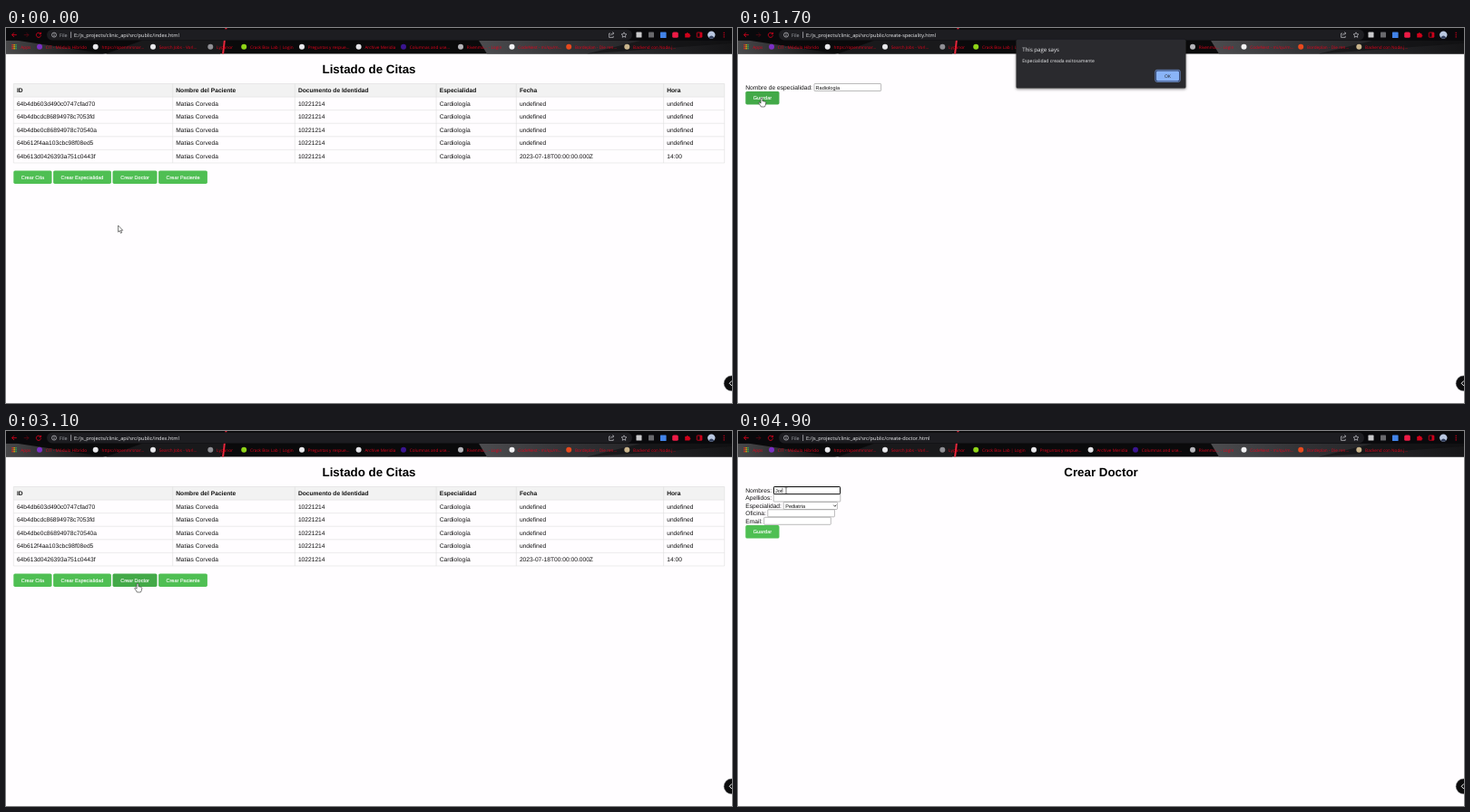
An HTML page that plays this animation: 800 by 414 pixels, repeating every 5 s.

```html
<!DOCTYPE html>
<html lang="es">
<head>
<meta charset="utf-8">
<title>Listado de Citas</title>
<style>
html, body { margin: 0; width: 100%; height: 100%; overflow: hidden; background: #fffdff; }
svg { display: block; width: 800px; height: 414px; text-rendering: geometricPrecision; }
text { font: 6.667px "Liberation Sans", Arial, sans-serif; fill: #111; white-space: pre; }
.h1 { font-size: 13.333px; font-weight: bold; text-anchor: middle; fill: #000; }
.th { font-weight: bold; }
.btn rect { fill: #4fbf53; }
.btn.hover rect { fill: #43a948; }
.btn text { font-size: 5.556px; fill: #fff; stroke: #fff; stroke-width: .12; text-anchor: middle; }
.field { font-size: 5.556px; }
.box { fill: #fff; stroke: #767676; stroke-width: .5; }
.box.focus { stroke: #000; stroke-width: 1; }
.ui { font-family: "Open Sans", "Noto Sans", sans-serif; fill: #f1f2f4; }
.mark { font-size: 4.7px; fill: #e3001b; }
.red { fill: none; stroke: #d0021b; stroke-width: .9; }
.pale { fill: none; stroke: #c9c9cf; stroke-width: .7; }
</style>
</head>
<body>
<svg id="stage" viewBox="0 0 800 414">
  <defs>
    <linearGradient id="left"><stop offset="0" stop-color="#48484a"/><stop offset="1" stop-color="#0a0a0b"/></linearGradient>
    <linearGradient id="right"><stop offset="0" stop-color="#4c4c4f"/><stop offset=".35" stop-color="#333336"/><stop offset="1" stop-color="#151517"/></linearGradient>
    <filter id="shade" x="-10%" y="-20%" width="120%" height="150%"><feDropShadow dx="0" dy="1" stdDeviation="1.6" flood-opacity=".5"/></filter>
  </defs>
  <rect width="800" height="414" fill="#fffdff"/>

  <g id="chrome">
    <rect width="800" height="28.5" fill="#0a0a0b"/>
    <path d="M0 13.8H12L110 28.5H0z" fill="url(#left)"/>
    <path d="M110 28.5L150 13.8H240L236 28.5z" fill="#19191b"/>
    <path d="M521 13.8H800V28.5H530z" fill="url(#right)"/>
    <path d="M640 28.5L700 13.8H800V17z" fill="#0e0e10" opacity=".6"/>
    <path d="M241.5 0h2l-3.4 28.5h-2z" fill="#e8283c"/>
    <rect y="1.2" width="800" height="12.6" fill="#0a0a0c" opacity=".85"/>
    <rect x="45" y="1.8" width="645" height="11.6" rx="5.8" fill="#1d1d21"/>
    <path class="red" d="M11.8 7.6H6.6M9 5.2L6.6 7.6L9 10M38 6.2A2.6 2.6 0 1 0 38.5 8.2M38.5 4.8v2h-2"/>
    <path class="red" d="M19.8 7.6h5M22.5 5.2l2.4 2.4l-2.4 2.4" opacity=".35"/>
    <circle class="pale" cx="53" cy="7.6" r="2.5"/>
    <path class="pale" d="M53 7.2v1.9M53 5.8v.7M71.6 4.2v6.8"/>
    <text class="ui" x="59" y="9.6" style="font-size:5.4px;fill:#a5a8ad">File</text>
    <text class="ui" id="url" x="75" y="9.6" style="font-size:5.55px"></text>
    <path class="pale" d="M666 6h-1.4v4.4h4.6v-1.6M666.3 8.4q.3-2.6 3.4-2.6M668.4 4.4l1.5 1.4l-1.5 1.4"/>
    <path class="pale" d="M681 4.8l.9 1.9l2 .2l-1.5 1.4l.4 2l-1.8-1l-1.8 1l.4-2l-1.5-1.4l2-.2z"/>
    <rect x="694.5" y="4.6" width="6" height="6" rx=".6" fill="#c9c9cb"/>
    <rect x="708" y="4.6" width="6" height="6" rx=".6" fill="#68686c"/>
    <rect x="721" y="4.4" width="6.6" height="6.6" rx=".6" fill="#4283e8"/>
    <rect x="734.2" y="4.4" width="6.6" height="6.4" rx="1.6" fill="#ec1b46"/>
    <path d="M748.2 6h1.6a1 1 0 0 1 2 0h1.6v1.6a1 1 0 0 1 0 2v1h-5.2z" fill="#d0021b"/>
    <rect class="red" x="761.3" y="5" width="5.6" height="5.2" rx=".5"/>
    <path d="M764.5 5h2.4v5.2h-2.4z" fill="#d0021b"/>
    <circle cx="777.3" cy="7.6" r="4.2" fill="#b9c7e0"/>
    <path d="M774.3 10.5q3-4 6 0q-3 2.4-6 0z" fill="#33405e"/>
    <path d="M790.6 4.7h1.2v1.2h-1.2zM790.6 7h1.2v1.2h-1.2zM790.6 9.3h1.2v1.2h-1.2z" fill="#d0021b"/>
  </g>

  <g id="index"></g>
  <g id="speciality"></g>
  <g id="doctor"></g>

  <g id="dialog">
    <rect x="306.5" y="12.8" width="187" height="53.7" rx="1.5" fill="#292a2d" filter="url(#shade)"/>
    <text class="ui" x="313.3" y="25.8" style="font-size:6.05px">This page says</text>
    <text class="ui" x="313.3" y="37.6" style="font-size:5.06px">Especialidad creada exitosamente</text>
    <rect x="459.8" y="46.3" width="27.4" height="13.2" rx="2" fill="#29355a" stroke="#8ab4f8" stroke-width=".6"/>
    <rect x="461" y="47.4" width="25" height="11" rx="1.4" fill="#8ab4f8"/>
    <text class="ui" x="473.4" y="54.7" text-anchor="middle" style="font-size:5px;fill:#202124">OK</text>
  </g>

  <circle cx="799.5" cy="392.3" r="8.3" fill="#0b0b0c" stroke="#55555a" stroke-width=".6"/>
  <path d="M800 389.4l-2.8 2.9l2.8 2.9" fill="none" stroke="#fff" stroke-width="1"/>

  <g id="cursor" stroke="#222" stroke-width=".6" stroke-linejoin="round">
    <path id="arrow" fill="#fff" d="M0 0V7.2L1.7 5.7L2.8 8.4L4.1 7.9L3 5.3H5.1Z"/>
    <path id="hand" fill="#fff" d="M-.9 .8Q0-.6.9.8V3.6L2 3.8L3.2 4.1L4.4 4.6Q4.8 4.8 4.8 5.6L4.2 8.4L3.4 10H-.6L-1.6 8.2L-3.2 6Q-3.4 4.8-2.2 5L-.9 6.2Z"/>
    <path id="beam" fill="none" d="M-1.3-3.3H-.4L0-2.9L.4-3.3H1.3M0-2.9V2.9M-1.3 3.3H-.4L0 2.9L.4 3.3H1.3"/>
  </g>
</svg>
<script>
const NS = "http://www.w3.org/2000/svg";
const $ = id => document.getElementById(id);

function add(parent, tag, attrs, content) {
  const el = document.createElementNS(NS, tag);
  for (const k in attrs) el.setAttribute(k, attrs[k]);
  if (content) el.textContent = content;
  return parent.appendChild(el);
}
const label = (g, x, y, s, cls = "") => add(g, "text", { x, y, class: cls }, s);
const heading = (g, s) => label(g, 400, 49.8, s, "h1");
const box = (g, x, y, w = 73.6, h = 8) =>
  add(g, "rect", { x, y, width: w, height: h, rx: .7, class: "box" });

function button(g, x, y, w, s) {
  const b = add(g, "g", { class: "btn" });
  add(b, "rect", { x, y, width: w, height: 14.6, rx: 1.7 });
  label(b, x + w / 2, y + 9.2, s);
  return b;
}

// bookmarks: icon x, colour, title
[
  [37, "#7b2fc4", "CIT - Módulo Hibrido"],
  [98.7, "#e9e9ec", "https://openmrsnar..."],
  [162, "#e9e9ec", "Search Jobs - Vorl..."],
  [225.3, "#8f8f94", "Lypanor"],
  [262.2, "#8fd418", "Crack Box Lab | Login"],
  [326, "#e9e9ec", "Preguntas y respue..."],
  [388.6, "#e4e4e8", "Archive Meridia"],
  [438, "#3a1590", "Columnas and use..."],
  [501, "#b5b5ba", "Rivenma... - Login"],
  [557.5, "#f2f2f4", "CodeNest - mi/qu/m..."],
  [620.2, "#e8491d", "Bordeplan - Die ren..."],
  [684.3, "#c9b48c", "Backend con Node.j..."]
].forEach(([x, fill, s]) => {
  add($("chrome"), "circle", { cx: x, cy: 20.7, r: 3, fill });
  label($("chrome"), x + 6.8, 22.6, s, "ui mark");
});
for (let i = 0; i < 9; i++)
  add($("chrome"), "rect", { x: 6.4 + i % 3 * 2, y: 18 + (i / 3 | 0) * 2, width: 1.4, height: 1.4,
    fill: ["#d93025", "#f9ab00", "#34a853"][i % 3] });
label($("chrome"), 16.3, 22.6, "Apps", "ui mark");

// appointment list
const list = $("index");
heading(list, "Listado de Citas");
const cols = [8.3, 183.7, 318.3, 474.1, 562.3, 724.6, 791.7];
const rowY = i => 61.5 + i * 14.58;
add(list, "rect", { x: 8.3, y: 61.5, width: 783.4, height: 14.58, fill: "#f2f2f2" });
let grid = cols.map(x => `M${x} 61.5V${rowY(6)}`).join("");
for (let i = 0; i < 7; i++) grid += `M8.3 ${rowY(i)}H791.7`;
add(list, "path", { d: grid, stroke: "#ddd", "stroke-width": .6 });
const ids = ["64b4db603d490c0747cfad70", "64b4dbcdc86894978c7053fd", "64b4dbe0c86894978c70540a",
  "64b612f4aa103cbc98f08ed5", "64b613d0426393a751c0443f"];
const rows = [["ID", "Nombre del Paciente", "Documento de Identidad", "Especialidad", "Fecha", "Hora"]];
ids.forEach((id, i) => rows.push([id, "Matias Corveda", "10221214", "Cardiología",
  ...(i < 4 ? ["undefined", "undefined"] : ["2023-07-18T00:00:00.000Z", "14:00"])]));
rows.forEach((r, i) => r.forEach((s, j) => label(list, cols[j] + 3.6, rowY(i) + 9.5, s, i ? "" : "th")));
button(list, 8.3, 157.4, 42.2, "Crear Cita");
const toSpeciality = button(list, 52.1, 157.4, 63.8, "Crear Especialidad");
const toDoctor = button(list, 117.5, 157.4, 49, "Crear Doctor");
button(list, 168.1, 157.4, 53.8, "Crear Paciente");

// speciality form
const spec = $("speciality");
heading(spec, "Crear Especialidad");
label(spec, 8.3, 67.9, "Nombre de especialidad:");
const specBox = box(spec, 84, 61.5);
const specText = label(spec, 85.6, 67.5, "", "field");
const save = button(spec, 8.3, 69.9, 37.2, "Guardar");

// doctor form
const doc = $("doctor");
heading(doc, "Crear Doctor");
["Nombres:", "Apellidos:", "Especialidad:", "Oficina:", "Email:"].forEach((s, i) =>
  label(doc, 8.3, 67.9 + i * 8.4, s));
const nameBox = box(doc, 39.4, 61.6, 73.2);
box(doc, 39.2, 70);
box(doc, 50.2, 78.5, 59.2);
box(doc, 32.8, 86.8);
box(doc, 28.7, 95.3);
label(doc, 52.2, 84.6, "Pediatria", "field");
add(doc, "path", { d: "M105.3 81.7l1.5 1.6l1.5-1.6", fill: "none", stroke: "#111", "stroke-width": .8 });
const nameText = label(doc, 41, 67.6, "", "field");
const caret = add(doc, "rect", { x: 41, y: 62.8, width: .5, height: 5.6 });
button(doc, 8.3, 104, 37.2, "Guardar");

// pointer path: time, x, y
const path = [
  [0, 123.6, 218], [100, 120, 212], [300, 86, 166], [500, 85, 164], [600, 87, 162], [800, 118, 66],
  [1300, 118, 66], [1400, 70, 92], [1500, 26, 77], [1800, 26, 77], [2100, 472, 53],
  [2200, 468, 55], [2300, 442, 65.5], [2500, 430, 72], [2800, 210, 172], [3000, 151, 200],
  [3100, 145, 168], [3300, 145, 168], [3600, 96, 104], [3800, 53, 66], [5000, 53, 66]
];
function pointer(t) {
  const i = path.findIndex(p => p[0] > t);
  const [t0, x0, y0] = path[i - 1], [t1, x1, y1] = path[i];
  const k = (t - t0) / (t1 - t0);
  return [x0 + (x1 - x0) * k, y0 + (y1 - y0) * k];
}

const within = (t, a, b) => t >= a && t < b;
const show = (el, on) => el.style.display = on ? "" : "none";
const typed = (s, t, start, step) => s.slice(0, Math.max(0, Math.floor((t - start) / step) + 1));

function draw(now) {
  const t = Math.floor(now % 5000 / 100) * 100;
  const page = within(t, 400, 2200) ? "speciality" : t >= 3300 ? "doctor" : "index";
  for (const p of ["index", "speciality", "doctor"]) show($(p), p === page);
  $("url").textContent = "E:/js_projects/clinic_api/src/public/" + (page === "index" ? "" : "create-") + page + ".html";

  toSpeciality.classList.toggle("hover", t === 300);
  toDoctor.classList.toggle("hover", within(t, 3100, 3300));
  save.classList.toggle("hover", within(t, 1500, 1900));

  specBox.classList.toggle("focus", within(t, 800, 1500));
  specText.textContent = typed("Radiología", t, 900, 45);
  nameBox.classList.toggle("focus", t >= 3800);
  const name = typed("Jor", t, 4200, 300);
  nameText.textContent = name;
  show(caret, t >= 3800);
  caret.setAttribute("x", 41 + [0, 2.8, 5.9, 7.7][name.length]);

  show($("dialog"), within(t, 1600, 2400));
  $("dialog").style.opacity = t < 2200 ? 1 : t < 2300 ? .3 : .015;

  const hand = within(t, 300, 600) || within(t, 1500, 1900) || within(t, 3100, 3400);
  const beam = within(t, 800, 1400) || t >= 3800;
  show($("hand"), hand);
  show($("beam"), beam);
  show($("arrow"), !hand && !beam);
  $("cursor").setAttribute("transform", `translate(${pointer(t)})`);
}

const begin = performance.now();
(function loop() {
  draw(performance.now() - begin);
  requestAnimationFrame(loop);
})();
</script>
</body>
</html>
```
